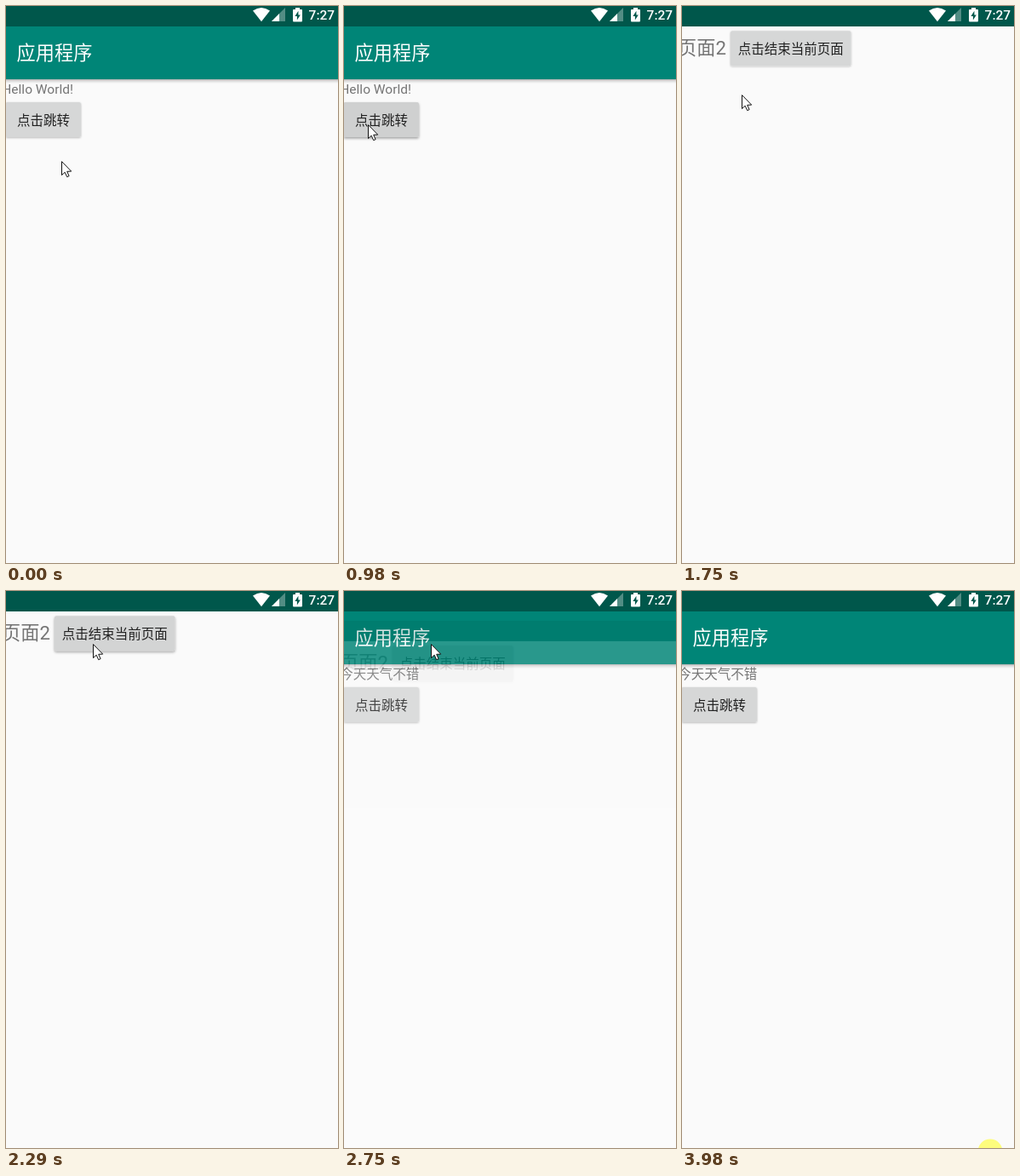
An HTML page for the animation above (4130 ms loop, 390 by 654 pixels).

```html
<!DOCTYPE html>
<html lang="zh-CN">
<head>
<meta charset="utf-8">
<title>页面跳转</title>
<style>
  html, body { margin: 0; width: 100%; height: 100%; overflow: hidden; background: #fafafa; }
  svg { display: block; width: 390px; height: 654px; }
  text { font-family: Roboto, "Noto Sans CJK SC", "Noto Sans CJK", sans-serif; font-size: 15.5px; white-space: pre; }
  .big { font-size: 22.2px; }
  .label { fill: #757575; }
  .action { fill: #212121; }
</style>
</head>
<body>
<svg viewBox="0 0 390 654">
  <defs>
    <linearGradient id="fade" x1="0" y1="0" x2="0" y2="1">
      <stop offset="0" stop-opacity=".3"/>
      <stop offset=".4" stop-opacity=".12"/>
      <stop offset="1" stop-opacity="0"/>
    </linearGradient>
    <filter id="rest" x="-20%" y="-30%" width="140%" height="170%">
      <feDropShadow dx="0" dy=".8" stdDeviation=".8" flood-opacity=".28"/>
    </filter>
    <filter id="raised" x="-20%" y="-30%" width="140%" height="170%">
      <feDropShadow dx="0" dy="1.6" stdDeviation="1.8" flood-opacity=".36"/>
    </filter>
  </defs>

  <g id="home">
    <rect width="390" height="654" fill="#fafafa"/>
    <rect width="390" height="24" fill="#00574b"/>
    <rect y="86" width="390" height="5" fill="url(#fade)"/>
    <rect y="24" width="390" height="62" fill="#008577"/>
    <text class="big" x="12.6" y="63.3" fill="#fff">应用程序</text>
    <text id="message" class="label" x="-4.7" y="102.8"></text>
    <rect id="open" x="-.5" y="113" width="88.5" height="41" rx="2"/>
    <text class="action" x="13" y="139.8">点击跳转</text>
  </g>

  <g id="detail">
    <rect width="390" height="24" fill="#00574b"/>
    <rect y="24" width="390" height="654" fill="#fafafa"/>
    <text class="big label" x="-4.9" y="56.6">页面2</text>
    <rect id="close" x="57" y="29.2" width="141.5" height="41" rx="2"/>
    <text class="action" x="65.8" y="56.1">点击结束当前页面</text>
  </g>

  <g fill="#fff">
    <path d="M290 5.6Q300-1.6 310 5.6L300 18.2Z"/>
    <path d="M312 18L328 2V18Z" opacity=".32"/>
    <path d="M312 18L321 9V18Z"/>
    <path d="M340 2h5v2h2q1 0 1 1v12.5q0 1-1 1h-9q-1 0-1-1V5q0-1 1-1h2Z"/>
    <path d="M343.4 5.8L339.4 12h2.5v4.6L345.8 10.4h-2.4Z" fill="#00574b"/>
    <text x="355.6" y="16.2" font-weight="500">7:27</text>
  </g>

  <g id="pointer">
    <circle id="press" r="14.4" fill="#ff0" opacity=".5"/>
    <path d="M.5.6V16.6L4.2 13.2L6.7 18.7L9.1 17.6L6.7 12.3L11.7 12.1Z" fill="#fff" stroke="#111" stroke-width="1"/>
  </g>
</svg>

<script>
const LOOP = 4130;
const $ = id => document.getElementById(id);
const [message, openBtn, detail, closeBtn, pointer, press] =
  ['message', 'open', 'detail', 'close', 'pointer', 'press'].map($);

function refreshes(t, first, last, count) {
  if (t < first) return 0;
  if (t >= last) return count;
  return 1 + Math.floor((t - first) / (last - first) * (count - 1) + 0.02);
}

const linear = p => p;
const easeOut = p => 1 - (1 - p) ** 1.6;
const smooth = p => p * p * (3 - 2 * p);

const START = [65, 182];
const MOVES = [
  { first: 70, last: 360, count: 5, to: [28, 139], ease: easeOut },
  { first: 1290, last: 1290, count: 1, to: [30, 139], ease: linear },
  { first: 1360, last: 1590, count: 4, to: [52, 127], ease: linear },
  { first: 1670, last: 1980, count: 5, to: [102, 62], ease: smooth },
  { first: 3130, last: 3130, count: 1, to: [142, 131], ease: linear },
  { first: 3210, last: 3590, count: 6, to: [340, 618], ease: linear },
  { first: 3670, last: 3900, count: 4, to: [362, 658.4], ease: easeOut }
];

function pointerAt(t) {
  let pos = START;
  for (const { first, last, count, to, ease } of MOVES) {
    if (t < first) break;
    const p = ease(refreshes(t, first, last, count) / count);
    pos = pos.map((v, i) => v + (to[i] - v) * p);
  }
  return pos;
}

// Slide up with a fade on opening, slide down with a fade on closing.
function detailAt(t) {
  const travel = 654 * 0.08;
  if (t < 1130) return { y: 0, alpha: 0 };
  if (t < 2590) {
    const e = refreshes(t, 1130, 1590, 7) * 77 - 38;
    return {
      y: travel * Math.max(0, 1 - e / 350) ** 5,
      alpha: 1 - Math.max(0, 1 - e / 200) ** 4
    };
  }
  const e = refreshes(t, 2590, 2820, 4) * 77 - 5;
  return {
    y: travel * Math.min(1, e / 250) ** 4,
    alpha: Math.min(1, Math.max(0, 1 - (e - 100) / 150))
  };
}

function paintButton(el, fill, raised) {
  el.setAttribute('fill', fill);
  el.setAttribute('filter', raised ? 'url(#raised)' : 'url(#rest)');
}

const within = (t, a, b) => t >= a && t < b;

function render(t) {
  message.textContent = t < 2000 ? 'Hello World!' : '今天天气不错';

  const tint = within(t, 670, 2000) ? '#cfd0d0' : within(t, 600, 670) ? '#d2d3d3' : '#d6d7d7';
  paintButton(openBtn, tint, within(t, 980, 2000));

  const held = within(t, 2210, 2590);
  paintButton(closeBtn, held ? '#d3d4d4' : '#d6d7d7', held);

  const { y, alpha } = detailAt(t);
  detail.setAttribute('transform', `translate(0 ${y.toFixed(2)})`);
  detail.setAttribute('opacity', alpha.toFixed(3));
  detail.setAttribute('visibility', alpha > 0 ? 'visible' : 'hidden');

  const [px, py] = pointerAt(t);
  pointer.setAttribute('transform', `translate(${Math.round(px)} ${Math.round(py)})`);
  const down = within(t, 430, 600) || within(t, 2060, 2210) || t >= 3980;
  press.setAttribute('visibility', down ? 'visible' : 'hidden');
}

const begin = performance.now();
function tick() {
  render((performance.now() - begin) % LOOP);
  requestAnimationFrame(tick);
}
render(0);
requestAnimationFrame(tick);
</script>
</body>
</html>
```
